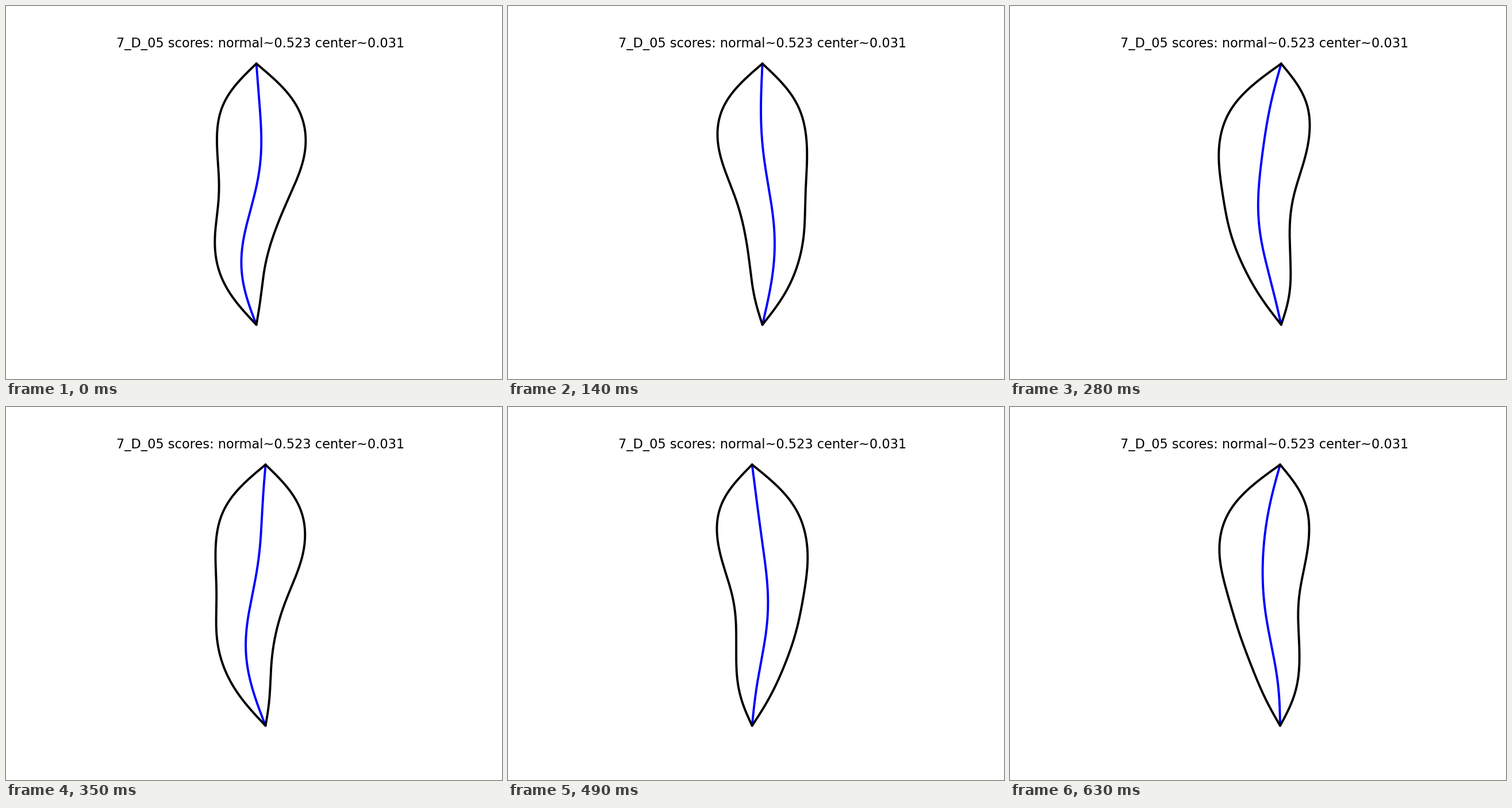
Write a matplotlib script that moves like this. It is 863 by 649 pixels and loops after 700 ms.

```python
import numpy as np
import matplotlib.pyplot as plt
from matplotlib.animation import FuncAnimation

W, H, DPI = 863, 649, 64
PT = 72 / DPI                      # points per pixel
TOP, BOTTOM, MID_X = 100.3, 554.6, 442.4
STEPS = 10

# Swimming phase in degrees at a few key steps
KEY_STEP = [0, 1, 3, 5, 6, 8, 9]
KEY_PHASE = [-3, 82, 211, 322, 393, 525, 585]

s = np.linspace(0, 1, 300)
y = TOP + (BOTTOM - TOP) * s


def sines(*amps):
    """Sum of standing waves along the body, zero at both tips."""
    return sum(a * np.sin(k * np.pi * s) for k, a in enumerate(amps, 1))


half = sines(73.9, 16.5, 12.5, 1.4, 1.3, 0.3, 0.5)   # half width


def midline(step):
    """Two standing waves in quadrature make the bend travel downwards."""
    phase = np.radians(np.interp(step, KEY_STEP, KEY_PHASE))
    gain = 1.08 - 0.02 * step
    bow = -6 + 33 * gain * np.sin(phase)
    sway = 1.5 + 14.5 * gain * np.cos(phase)
    return sines(bow, sway, -1.5 - 0.22 * sway - 0.06 * bow, 0.035 * bow)


fig = plt.figure(figsize=(W / DPI, H / DPI), dpi=DPI, facecolor="white")
ax = fig.add_axes([0, 0, 1, 1])
ax.set(xlim=(0, W), ylim=(H, 0))
ax.axis("off")

ax.text(443, 71.8, "7_D_05 scores: normal~0.523 center~0.031",
        family="DejaVu Sans", size=22.55 * PT, ha="center", va="baseline")

style = dict(lw=3.9 * PT, solid_joinstyle="round", solid_capstyle="round")
spine, = ax.plot([], [], color="blue", **style)
outline, = ax.plot([], [], color="black", **style)


def draw(step):
    mid = midline(step)
    left, right = mid - half, mid + half
    shift = MID_X - (left.min() + right.max()) / 2   # keep the body centred
    spine.set_data(mid + shift, y)
    outline.set_data(np.r_[left, right[::-1]] + shift, np.r_[y, y[::-1]])
    return spine, outline


anim = FuncAnimation(fig, draw, frames=STEPS, interval=70,
                     repeat=True, repeat_delay=0, blit=False)
plt.show()
```
